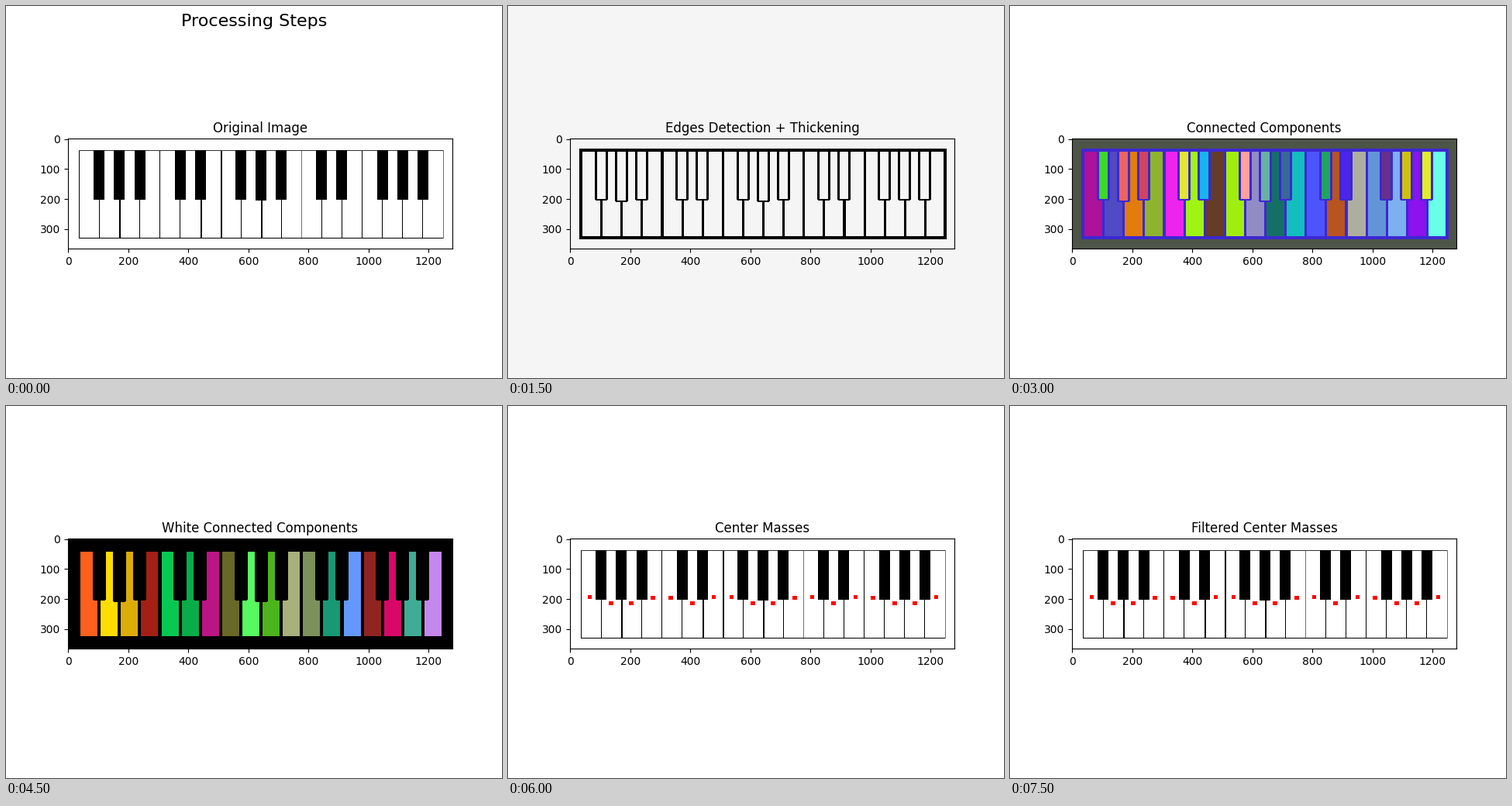
These frames come from a looping animation (640 px wide and 480 px high, 8 s). A matplotlib script:

```python
import numpy as np
import matplotlib.pyplot as plt
from matplotlib.animation import FuncAnimation
from matplotlib.colors import to_rgb

W, H = 640, 480
TOP, BOTTOM = 188, 297           # inside of the thick frame
AREA = (slice(171, 313), slice(80, 576))
SLOTS = [0, 1, 2, 4, 5, 7, 8, 9, 11, 12, 14, 15, 16]
DEEP = (1, 8)                    # black keys that reach a little lower
LINE = -1

ALL_WHITE = ("#ad129b #504ac4 #e27c0c #8eb42c #ec24ee #a0f414 #643c28 #a0ee0c #928cc4 "
             "#147064 #12bebe #4c54fc #b85420 #aeaea0 #6494d8 #7cb0f0 #8c12ee #68fee8").split()
ALL_BLACK = ("#3cd82c #ea6464 #d04460 #e4e434 #18b4ec #ffa0a0 #68b0a4 #386898 #20a464 "
             "#4c24ec #683088 #d0c00c #e0ec2c").split()
ONLY_WHITE = ("#fc601c #ffdc00 #dcac08 #a42014 #08c854 #08ac48 #bc1484 #686828 #58f860 "
              "#4cb41c #a8b07c #7c905c #189874 #6498ff #902420 #d80868 #40ac94 #c488ec").split()


def px(v):
    return int(np.floor(v + 0.5))


def canvas(color="white"):
    return np.ones((H, W, 3)) * to_rgb(color)


def fill(img, mask, color):
    img[mask] = to_rgb(color)


def regions(width):
    """Label map: white keys 1..18, black keys 21..33, thick lines -1."""
    lab = np.zeros((H, W), int)
    lab[184:301, 92:566] = LINE
    for k in range(18):
        x = px(96.1 + 26.11 * k)
        lab[TOP:BOTTOM, x:min(x + width, 562)] = k + 1
    for j, slot in enumerate(SLOTS):
        x, end = px(112 + 26.08 * slot), 253 if slot in DEEP else 251
        lab[TOP:end - 1, x:x + 17] = LINE
        lab[end - 1, x + 1:x + 16] = LINE
        lab[TOP:end - 2, x + 3:x + 14] = 21 + j
    return lab


def keyboard():
    img = canvas()
    black = to_rgb("black")
    for k in range(19):
        x = px(94.1 + 26.08 * k)
        wide = 2 if k in (2, 6, 7, 9) else 1
        img[186:300, x:x + wide] = to_rgb("0.45") if k in (11, 18) else black
    img[186, 94:564] = to_rgb("0.2")
    img[299, 94:564] = black
    for slot in SLOTS:
        x = px(113.35 + 26.09 * slot)
        img[186:251 if slot == 8 else 250, x:x + 14] = black
    return img


def edges():
    img = canvas("#f5f5f5")
    fill(img, regions(23) == LINE, "black")
    return img


def components():
    img, lab = canvas(), regions(23)
    img[AREA] = to_rgb("#4d5448")
    fill(img, lab == LINE, "#3c28d2")
    for k, color in enumerate(ALL_WHITE, 1):
        fill(img, lab == k, color)
    for k, color in enumerate(ALL_BLACK, 21):
        fill(img, lab == k, color)
    return img


def white_components():
    img, lab = canvas(), regions(22)
    img[AREA] = 0
    for k, color in enumerate(ONLY_WHITE, 1):
        fill(img, lab == k, color)
    return img


def centers():
    img, lab = keyboard(), regions(22)
    for k in range(1, 19):
        y, x = (v.mean() + 0.5 for v in np.nonzero(lab == k))
        img[px(y - 2.9):px(y + 2.6), px(x - 2.9):px(x + 2.9)] = to_rgb("red")
    return img


marked = centers()
STEPS = [("Original Image", keyboard()),
         ("Edges Detection + Thickening", edges()),
         ("Connected Components", components()),
         ("White Connected Components", white_components()),
         ("Center Masses", marked),
         ("Filtered Center Masses", marked)]

plt.rcParams["font.family"] = "DejaVu Sans"
fig = plt.figure(figsize=(6.4, 4.8), dpi=100)
ax = fig.add_subplot()
ax.patch.set_visible(False)
ax.set_aspect("equal")
ax.set_xlim(-0.5, 1279.5)
ax.set_ylim(365.5, -0.5)
ax.set_xticks(range(0, 1201, 200))
ax.set_yticks(range(0, 301, 100))
heading = fig.suptitle("Processing Steps", fontsize=16)
title = ax.set_title("")
picture = fig.figimage(STEPS[0][1], 0, 0, origin="upper", zorder=-1)


def draw(frame):
    step = min(frame // 3, len(STEPS) - 1)
    name, img = STEPS[step]
    title.set_text(name)
    picture.set_data(img)
    heading.set_visible(step == 0)
    fig.set_facecolor(img[0, 0])
    return picture, title, heading


anim = FuncAnimation(fig, draw, frames=16, interval=500, repeat=True, repeat_delay=0)
plt.show()
```
